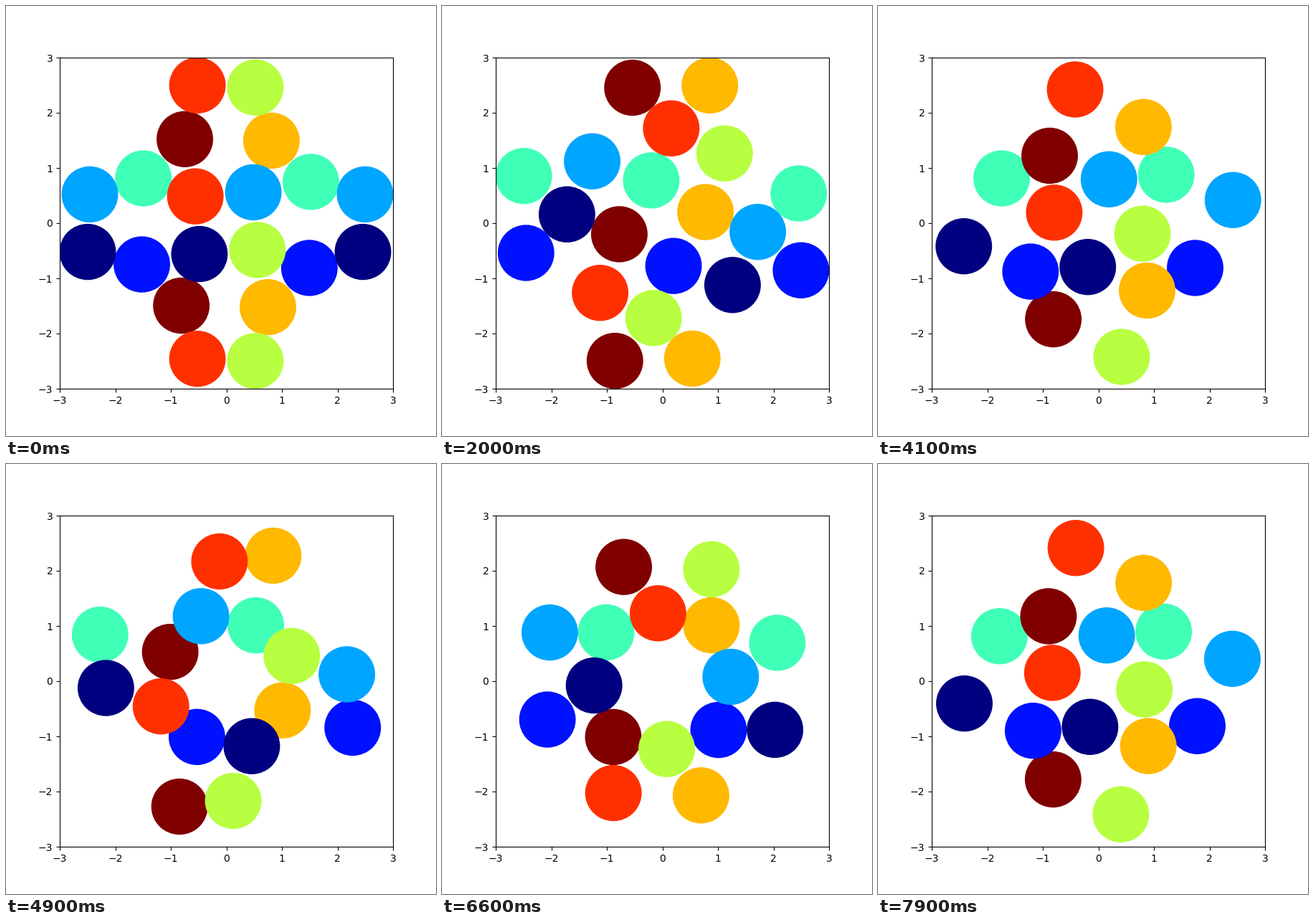
These frames come from a looping animation (600x600 px, 8000 ms). A matplotlib script:

```python
import numpy as np
import matplotlib.pyplot as plt
from matplotlib.animation import FuncAnimation

FRAMES = 80
PERIOD = 37.5        # frames between two discs of one colour
CROSS = 2 * PERIOD   # frames for one disc to cross the square
LIMIT = 2.5          # discs are hidden once their centre passes this


def lane(start, drift, cosines, sines):
    """Steady drift plus a weave of a few harmonics, as a complex path."""
    def path(t):
        u = (t - start) / CROSS
        angle = 2 * np.pi * u
        z = drift * u
        z += sum(c * np.cos(k * angle) for k, c in enumerate(cosines))
        z += sum(s * np.sin(k * angle) for k, s in enumerate(sines, 1))
        return z
    return path


# Two lanes cross the top from right to left, half a period apart.
inner = lane(PERIOD / 2, -4.95 + .315j,
             [2.425 + .653j, .059 - .094j, -.022 - .023j,
              -.014 + .038j, .042 - .054j],
             [.311 + .079j, .025 - .038j, .040 + .032j])
outer = lane(0, -4.955,
             [2.776 + .547j, -.243 - .021j, -.035 + .021j,
              .010 + .002j, -.011 - .028j],
             [.260 - .630j, .062 + .096j, .037 + .017j])

fig, ax = plt.subplots(figsize=(6, 6), dpi=100)
ax.set_xlim(-3, 3)
ax.set_ylim(-3, 3)

# Each lane appears four times, turned by quarter turns.
colors = plt.cm.jet(np.linspace(0, 1, 8))
discs = []
for path, order in ((inner, (3, 7, 1, 5)), (outer, (2, 6, 0, 4))):
    for turn, index in enumerate(order):
        for lap in range(-1, 3):
            disc = plt.Circle((0, 0), 0.5, color=colors[index])
            ax.add_patch(disc)
            discs.append((disc, path, 1j**turn, lap * PERIOD))


def update(frame):
    phase = frame % PERIOD
    for disc, path, turn, delay in discs:
        z = path(phase + delay)
        disc.set_visible(abs(z.real) <= LIMIT)
        z *= turn
        disc.center = z.real, z.imag
    return [d[0] for d in discs]


anim = FuncAnimation(fig, update, frames=FRAMES, interval=100,
                     repeat=True, repeat_delay=0, blit=False)
plt.show()
```
